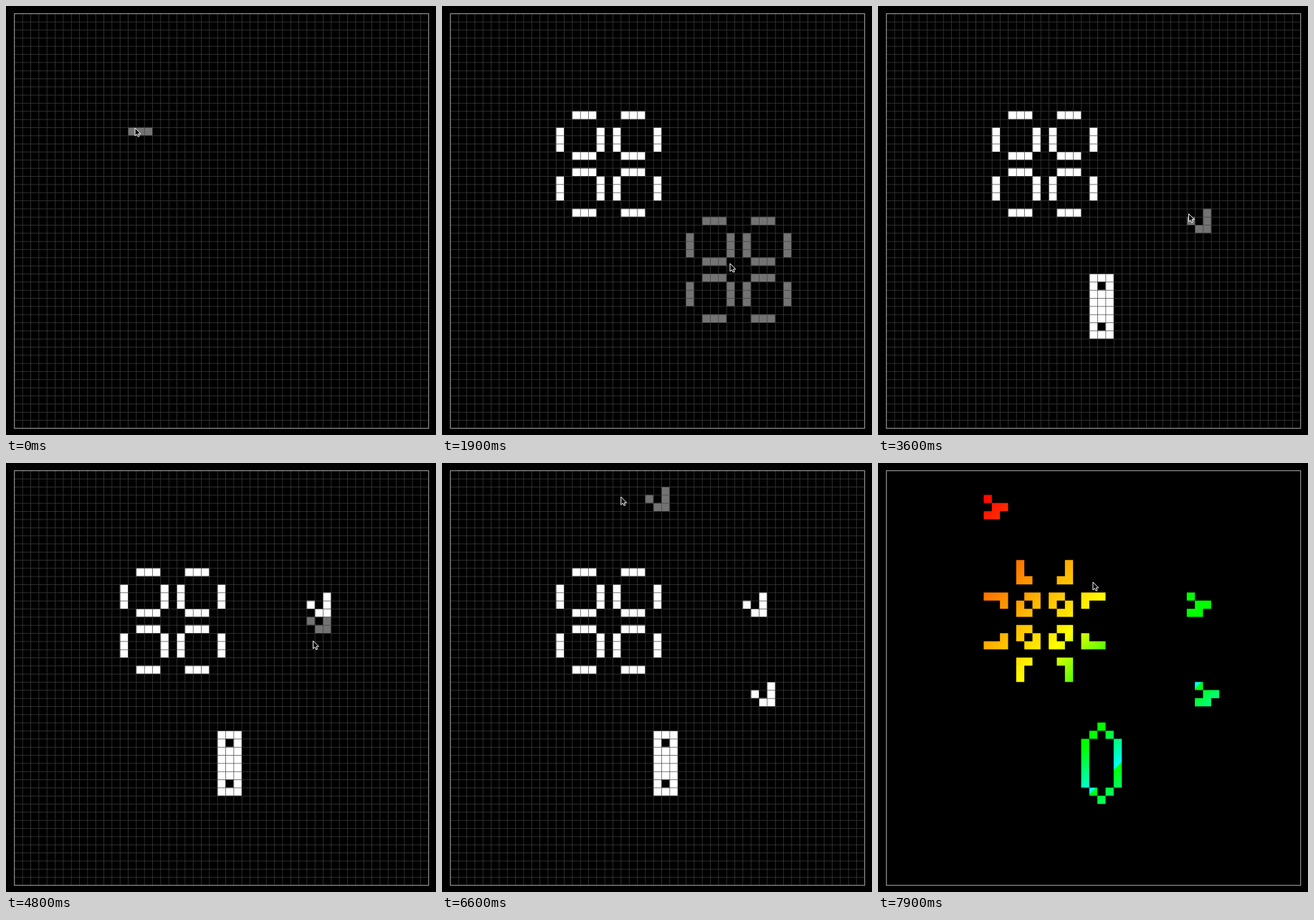
These frames come from a looping animation (600x598 px, 8000 ms). An HTML page with a canvas:

```html
<!DOCTYPE html>
<html lang="en">
<head>
<meta charset="utf-8">
<title>Game of Life</title>
<style>
html, body { margin: 0; width: 100%; height: 100%; overflow: hidden; background: #000; }
canvas { display: block; }
</style>
</head>
<body>
<canvas id="stage" width="600" height="598"></canvas>
<script>
const ctx = document.getElementById('stage').getContext('2d');
const N = 51, SIZE = 578, PITCH = SIZE / N, X0 = 11.5, Y0 = 10.5, LINE = 0.7;
const LOOP = 8000, TICK = 100, RUN = 78;

// Patterns are lists of [column, row]
const parse = text => text.split('/').flatMap((line, r) =>
  [...line].flatMap((ch, c) => ch === 'O' ? [[c, r]] : []));

const bar = '..OOO...OOO..', gap = '.............', side = 'O....O.O....O';
const half = [bar, gap, side, side, side, bar];
const blinker = parse('OOO');
const beacon = parse('OO../OO../..OO/..OO');
const pulsar = parse([...half, gap, ...half.slice().reverse()].join('/'));
const pentadecathlon = parse('OOO/O.O/OOO/OOO/OOO/OOO/O.O/OOO');
const glider = parse('..O/O.O/.OO');

// Selected and clicked patterns, by tick
const brushes = [[0, blinker], [3, beacon], [7, pulsar], [22, pentadecathlon], [31, glider]];
const clicks = [[14, pulsar], [29, pentadecathlon], [44, glider], [51, glider], [70, glider]];

// Eased pointer moves: from tick, to tick, column, row
const home = [14.87, 14.03];
const moves = [
  [10, 11, 13.46, 12.05],
  [16, 19, 34.45, 30.7],
  [23, 28, 25.75, 32.35],
  [30, 33, 37.24, 24.59],
  [36, 38, 38.2, 29.3],
  [38, 43, 36.2, 15.4],
  [46, 50, 37.4, 26.4],
  [51, 55, 11.7, 6.3],
  [55, 58.6, 3.8, 3.2],
  [60, 62, 14.8, 7.2],
  [62, 64, 26.2, 2.9],
  [64, 69, 11.5, 3.75],
  [71, 73, 21.13, 15.02],
  [76, 79, 25.45, 13.68]
];

function pointer(tick) {
  let [c, r] = home;
  for (const [from, to, nc, nr] of moves) {
    const u = Math.min(1, Math.max(0, (tick - from) / (to - from)));
    const k = u * u * (3 - 2 * u);
    c += (nc - c) * k;
    r += (nr - r) * k;
  }
  return [c, r];
}

function place(cells, tick) {
  const [c, r] = pointer(tick).map(Math.floor);
  return cells.map(([x, y]) => [x + c, y + r]);
}

function evolve(cells) {
  const alive = new Set(cells.map(String)), count = new Map();
  for (const [c, r] of cells)
    for (let dc = -1; dc <= 1; dc++)
      for (let dr = -1; dr <= 1; dr++)
        if (dc || dr) {
          const key = `${c + dc},${r + dr}`;
          count.set(key, (count.get(key) || 0) + 1);
        }
  return [...count]
    .filter(([key, n]) => n === 3 || (n === 2 && alive.has(key)))
    .map(([key]) => key.split(',').map(Number));
}

// Colour depends on x + y
const rainbow = ctx.createLinearGradient(0, 0, 400, 400);
[
  [190, '#f00'], [505, '#ff0'], [612, '#0f0'], [685, '#0f0'],
  [757, '#0ff'], [757, '#0f0'], [800, '#00ff80']
].forEach(([sum, color]) => rainbow.addColorStop(sum / 800, color));

function drawCells(cells, fill) {
  ctx.beginPath();
  for (const [c, r] of cells) ctx.rect(X0 + c * PITCH, Y0 + r * PITCH, PITCH, PITCH);
  ctx.fillStyle = fill;
  ctx.fill();
}

function drawGrid() {
  ctx.fillStyle = '#404040';
  for (let k = 1; k < N; k++) {
    ctx.fillRect(X0 + k * PITCH, Y0, LINE, SIZE);
    ctx.fillRect(X0, Y0 + k * PITCH, SIZE, LINE);
  }
}

function drawBorder() {
  ctx.strokeStyle = '#b0b0b0';
  ctx.lineWidth = 1;
  ctx.strokeRect(X0 + 0.25, Y0 + 0.25, SIZE, SIZE);
}

const arrow = new Path2D('M0 .5V11.5L2.5 9.2L4.2 12.7L6 12L4.4 8.5H7.8Z');

function drawPointer([c, r]) {
  ctx.save();
  ctx.translate(X0 + c * PITCH, Y0 + r * PITCH);
  ctx.fillStyle = '#000';
  ctx.strokeStyle = '#fff';
  ctx.lineWidth = 1;
  ctx.fill(arrow);
  ctx.stroke(arrow);
  ctx.restore();
}

function draw(tick) {
  ctx.fillStyle = '#000';
  ctx.fillRect(0, 0, 600, 598);

  let cells = clicks.filter(([t]) => t <= tick).flatMap(([t, pattern]) => place(pattern, t));
  if (tick < RUN) {
    // The preview trails the pointer by one tick
    const brush = brushes.filter(([t]) => t <= tick).pop()[1];
    drawCells(place(brush, tick - 1), '#737373');
    drawCells(cells, '#fff');
    drawGrid();
  } else {
    for (let t = RUN; t < tick; t++) cells = evolve(cells);
    drawCells(cells, rainbow);
  }
  drawBorder();
  drawPointer(pointer(tick));
}

const start = performance.now();
function frame() {
  draw(Math.floor(((performance.now() - start) % LOOP) / TICK));
  requestAnimationFrame(frame);
}
frame();
</script>
</body>
</html>
```
